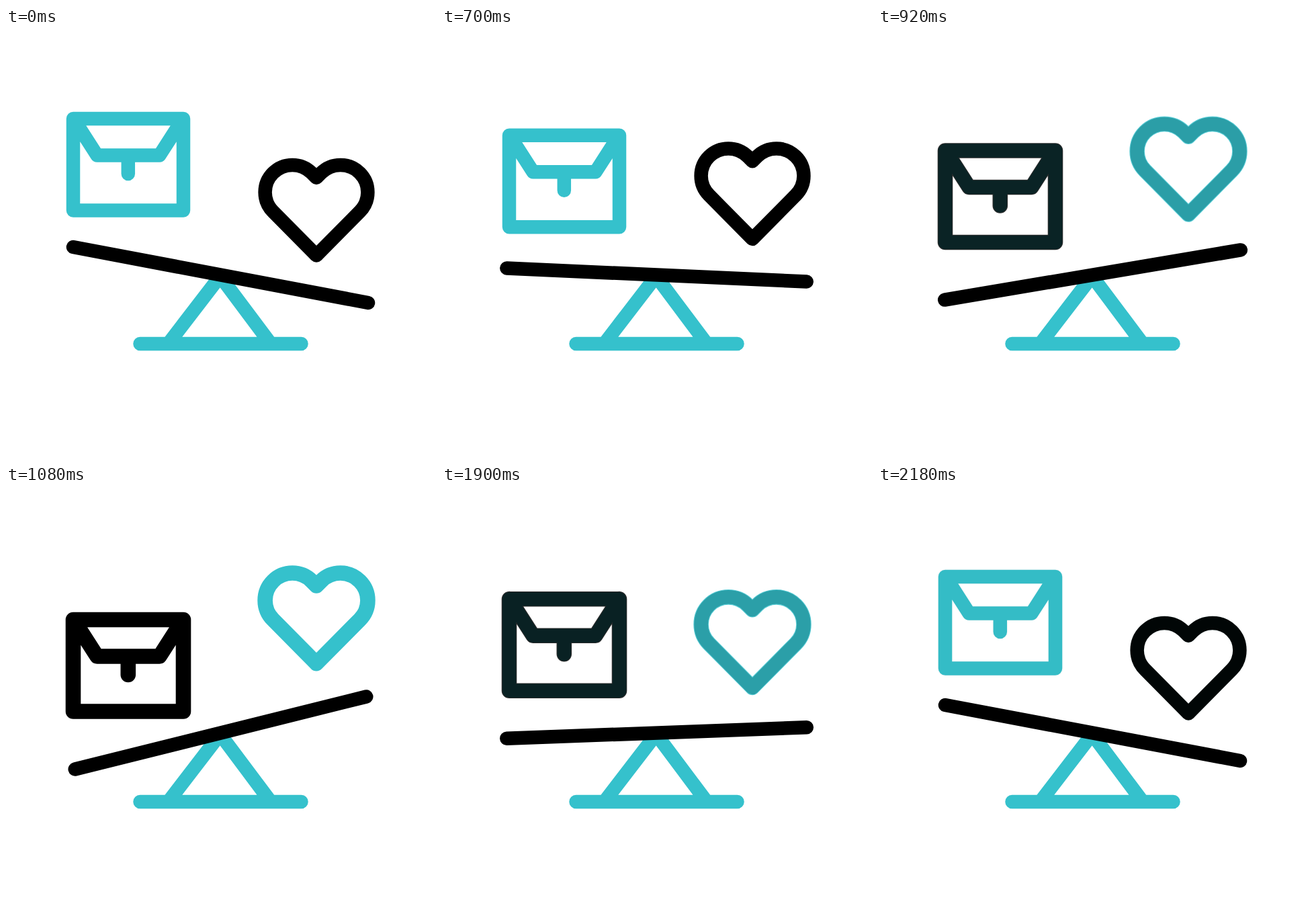
Write an HTML page that moves like this. It is 640 px wide and 640 px high and loops after 2.72 s.

```html
<!DOCTYPE html>
<html lang="en">
<head>
<meta charset="utf-8">
<title>Work and love in balance</title>
<style>
  html, body { margin: 0; width: 100%; height: 100%; overflow: hidden; background: #fff; }
  svg { display: block; width: 100vw; height: 100vh; }
  .line { fill: none; stroke-width: 20.5; stroke-linecap: round; stroke-linejoin: round; }
  .wide { stroke-width: 22.6; }
  .teal { stroke: #35c1cc; }
  .black { stroke: #000; }
</style>
</head>
<body>
<svg viewBox="0 0 640 640">
  <defs>
    <path id="case" d="M100 135H264V271.5H100ZM100.5 135L135.5 189.5H228.5L263.5 135M181.8 189.5V217"/>
    <path id="heart" d="M462 338.5L397.5 273.3A40.6 40.6 0 0 1 455 215.8L462 222.8L469 215.8A40.6 40.6 0 0 1 526.5 273.3Z"/>
  </defs>
  <path class="line teal" d="M199.5 470H439.5M241.5 470L318.7 369.4L394 470"/>
  <path id="beam" class="line black" d="M96.1 367.5H542.9"/>
  <g id="left">
    <use href="#case" class="line teal"/>
    <use href="#case" class="line wide black fade"/>
  </g>
  <g id="right">
    <use href="#heart" class="line black"/>
    <use href="#heart" class="line wide teal fade"/>
  </g>
</svg>
<script>
  const LOOP = 2720, STEP = 20;
  const DROP = 64, RISE = 74.4, TILT = 10.7, SWING = 24.7;
  const $ = id => document.getElementById(id);
  const fades = document.querySelectorAll('.fade');

  const ramp = (t, from, to) => Math.min(1, Math.max(0, (t - from) / (to - from)));
  const bez = (s, a, b) => 3 * s * (1 - s) ** 2 * a + 3 * s * s * (1 - s) * b + s ** 3;

  // Cubic Bezier easing, solved by bisection
  function ease(x) {
    if (x <= 0 || x >= 1) return x;
    let lo = 0, hi = 1;
    for (let i = 0; i < 24; i++) {
      const mid = (lo + hi) / 2;
      if (bez(mid, 0.32, 0.7) < x) lo = mid; else hi = mid;
    }
    return bez(lo, 0, 1);
  }

  function draw(time) {
    const t = Math.floor((time % LOOP) / STEP) * STEP;
    const go = ramp(t, 460, 1080);
    const back = 1 - ramp(t, 1640, 2180);
    const swing = ease(go) * back;
    const fade = t < 460 ? 0 : t < 1640
      ? ramp(t, 700, 968)
      : 1 - ramp(Math.min(t, 2180), 1840, 2190);

    $('left').setAttribute('transform', `translate(0 ${DROP * go * back})`);
    $('right').setAttribute('transform', `translate(0 ${-RISE * swing})`);
    $('beam').setAttribute('transform', `rotate(${TILT - SWING * swing} 319.5 367.5)`);
    fades.forEach(el => el.setAttribute('opacity', fade));
  }

  const start = performance.now();
  function tick() {
    draw(performance.now() - start);
    requestAnimationFrame(tick);
  }
  tick();
</script>
</body>
</html>
```
